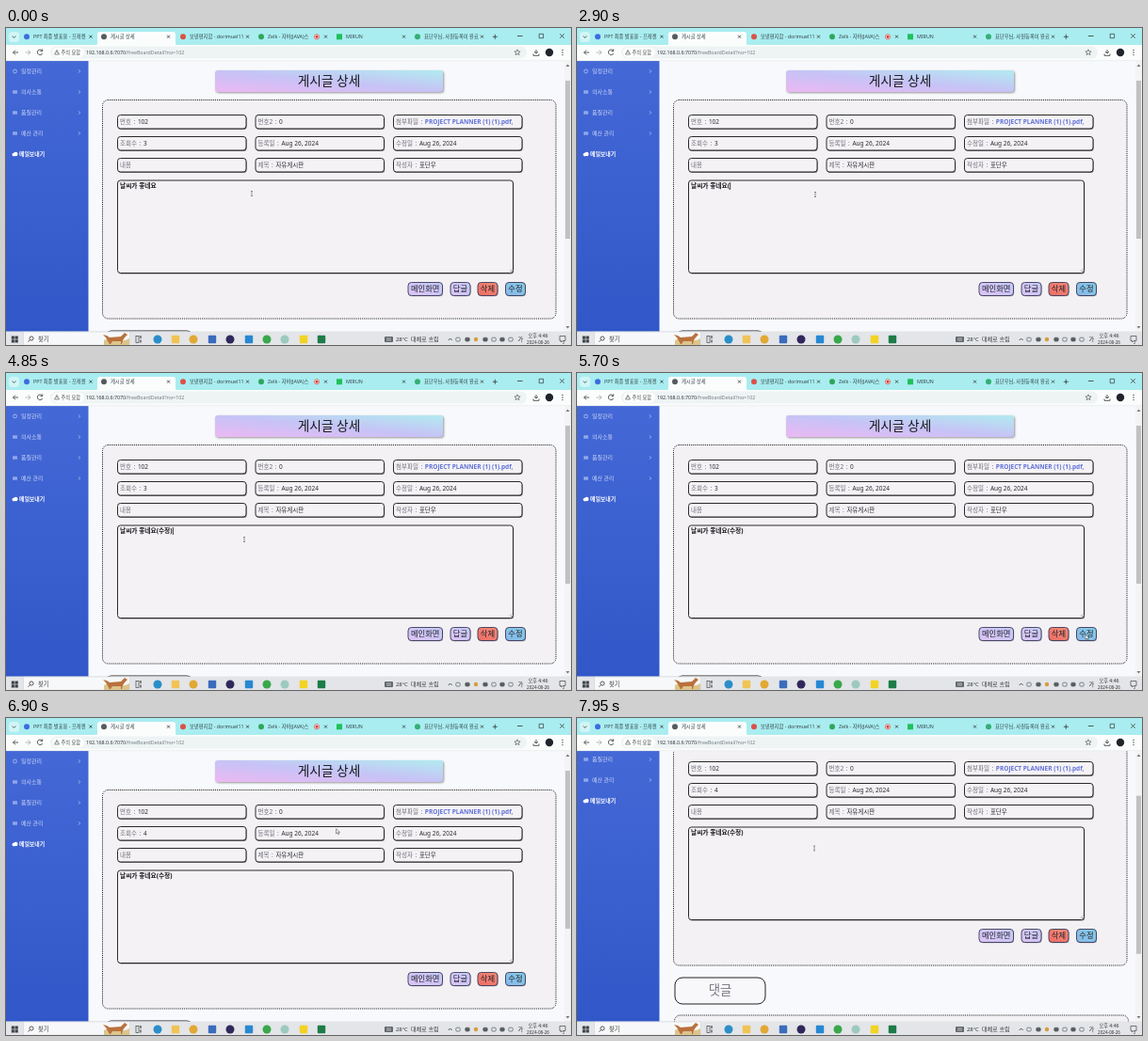
Write an HTML page that moves like this. It is 600 px wide and 337 px high and loops after 8 s.

```html
<!DOCTYPE html>
<html lang="ko">
<head>
<meta charset="utf-8">
<title>게시글 상세</title>
<style>
  html, body { margin: 0; width: 100%; height: 100%; overflow: hidden; background: #f8f9fc; }
  svg { display: block; width: 100vw; height: 100vh; }
  text { font-family: "Noto Sans", "Noto Sans CJK KR", "Noto Sans CJK", sans-serif; }
  .field { word-spacing: 0.9px; }
  .field tspan { word-spacing: 0; }
  .soft { filter: drop-shadow(1px 1.5px 1.2px #0006); }
</style>
</head>
<body>
<svg id="stage" viewBox="0 0 600 337"></svg>
<script>
const LOOP = 8000;
const INK = '#2c2c33', GREY = '#6c6c77';

// Markup helpers
const rect = (x, y, w, h, fill, extra = '') =>
  `<rect x="${x}" y="${y}" width="${w}" height="${h}" fill="${fill}" ${extra}/>`;
const circle = (x, y, r, fill, extra = '') =>
  `<circle cx="${x}" cy="${y}" r="${r}" fill="${fill}" ${extra}/>`;
const text = (x, y, size, fill, content, extra = '') =>
  `<text x="${x}" y="${y}" font-size="${size}" fill="${fill}" ${extra}>${content}</text>`;
const line = (d, color = '#333', width = 0.8, extra = '') =>
  `<path d="${d}" fill="none" stroke="${color}" stroke-width="${width}" ${extra}/>`;
const gradient = (id, colors, direction = 'x1="0" y1="1" x2="1" y2="0"') =>
  `<linearGradient id="${id}" ${direction}>` +
  colors.map((c, i) => `<stop offset="${i / (colors.length - 1)}" stop-color="${c}"/>`).join('') +
  '</linearGradient>';
const cross = (x, y, r) => line(`M${x - r} ${y - r}l${2 * r} ${2 * r}m0 ${-2 * r}l${-2 * r} ${2 * r}`);

const defs = `<defs>
  ${gradient('side', ['#4468d6', '#3157c8'], 'x1="0" y1="0" x2="0" y2="1"')}
  ${gradient('title', ['#ecb8f2', '#c6c3f6', '#b2ebf0'])}
  ${gradient('lilac', ['#dcc3f5', '#c3c9f6'])}
  ${gradient('coral', ['#ee6c64', '#f28a78'])}
  ${gradient('sky', ['#86b9ea', '#86cce6'])}
</defs>`;

function sideMenu() {
  const items = ['일정관리', '의사소통', '품질관리', '예산 관리'].map((name, i) => {
    const y = 46 + 22 * i;
    const icon = i ? rect(7, y - 1.8, 5, 3.6, '#8fa6ea', 'rx=".6"')
                   : circle(9.5, y, 1.9, 'none', 'stroke="#8fa6ea" stroke-width="1.1"');
    return icon + text(16, y + 2.2, 6, '#ccd6f6', name) +
      line(`M77 ${y - 1.7}l1.7 1.7l-1.7 1.7`, '#b3c2f2', 0.8);
  }).join('');
  return items + circle(8.3, 134.6, 1.8, '#fff') + circle(10.3, 134, 2.2, '#fff') +
    text(14, 136.2, 5.9, '#fff', '메일보내기', 'font-weight="700"');
}

const outlined = (x, y, w, h, r = 3) =>
  rect(x + 0.7, y + 1, w, h, '#77777c', `rx="${r}"`) +
  rect(x, y, w, h, '#f4f2f5', `rx="${r}" stroke="#2a2a2a" stroke-width="1"`);

const dotted = (x, y, w, h) =>
  rect(x, y, w, h, '#f3f1f4', 'rx="6" stroke="#222" stroke-width="1" stroke-dasharray="1.1 1"');

function fields() {
  const entries = [
    ['번호', '102'], ['번호2', '0'], ['첨부파일', 'PROJECT PLANNER (1) (1).pdf,'],
    ['조회수', '3'], ['등록일', 'Aug 26, 2024'], ['수정일', 'Aug 26, 2024'],
    ['내용', ''], ['제목', '자유게시판'], ['작성자', '표단우']
  ];
  return entries.map(([label, value], i) => {
    const x = 118.5 + 146.5 * (i % 3), y = 92.5 + 23 * Math.floor(i / 3);
    const style = i === 2 ? 'fill="#6272d8" font-weight="600"' : `fill="${INK}"`;
    const id = label === '조회수' ? 'id="views"' : '';
    const content = value ? `${label} : <tspan ${style} ${id}>${value}</tspan>` : label;
    return outlined(x, y, 136.5, 14.5) + text(x + 2.5, y + 9.6, 6.5, GREY, content, 'class="field"');
  }).join('');
}

const button = (x, w, fill, label) =>
  rect(x + 0.6, 271.2, w, 14, '#9a9aa6', 'rx="3.5"') +
  rect(x, 270.5, w, 14, `url(#${fill})`, 'rx="3.5" stroke="#3a3a58" stroke-width=".9"') +
  text(x + w / 2, 280.4, 8.3, '#24242e', label, 'text-anchor="middle"');

const page = `<g id="page">
  <g class="soft">${rect(222, 45, 242, 23, 'url(#title)', 'rx="3"')}</g>
  ${text(343, 60.8, 13.7, '#17171c', '게시글 상세', 'text-anchor="middle"')}
  ${dotted(102.5, 76.5, 481.5, 232.5)}
  ${fields()}
  ${outlined(118.5, 162, 420, 98.5)}
  ${line('M534.5 259l3-3m-1.2 3l1.2-1.2', '#777', 0.5)}
  <text id="body" x="121" y="170.4" font-size="6.7" font-weight="700" fill="#17171c"></text>
  ${rect(0, 164, 0.8, 8, '#111', 'id="caret"')}
  ${button(427, 36.5, 'lilac', '메인화면')}
  ${button(472, 21, 'lilac', '답글')}
  ${button(501, 21, 'coral', '삭제')}
  ${button(530.5, 21, 'sky', '수정')}
  ${rect(104, 322, 96, 28, '#f8f8fb', 'rx="8" stroke="#222" stroke-width="1"')}
  ${text(152, 340.3, 13.4, '#777783', '댓글', 'text-anchor="middle"')}
  ${dotted(103.5, 362, 482, 120)}
</g>`;

const scrollbar = rect(593, 35, 7, 288, '#f4f4f5') +
  '<path d="M594.5 41l2-2.5l2 2.5zM594.5 317l2 2.5l2-2.5z" fill="#777"/>' +
  rect(594, 56, 5, 168, '#c1c1c4', 'id="thumb"');

function browser() {
  const tabs = [
    [22, '#3f6be0', 'PPT 최종 발표용 - 프레젠'],
    [104, '#555b60', '게시글 상세'],
    [188, '#dc5147', '보낸편지함 - dorimuel11'],
    [271, '#2fa65a', 'Zelk - 자바(JAVA)스'],
    [354, '#20c05a', 'MIRUN'],
    [437, '#35ae74', '표단우님, 사원등록이 완료']
  ];
  const tabMarks = tabs.map(([x, color, label], i) =>
    (i === 4 ? rect(x - 3, 6.3, 6, 6, color) : circle(x, 9.3, 3, color)) +
    text(x + 7, 11.4, 5.3, '#35464b', label) +
    cross(i ? x + 68.5 : 90, 9.2, 1.5)).join('');
  return rect(0, 0, 600, 19, '#a9edf0') +
    '<path d="M94 19q3 0 3-3V7q0-3 3-3h77q3 0 3 3v9q0 3 3 3z" fill="#fbfdfd"/>' +
    rect(0, 18, 600, 17, '#fbfdfd') + rect(0, 34.6, 600, 0.5, '#d9e2e3') +
    rect(3, 4, 11, 11, '#d2f5f6', 'rx="3.5"') + line('M6.7 8.6l1.8 1.8l1.8-1.8') +
    tabMarks + circle(330, 9.3, 2.6, '#fff', 'stroke="#d63b36" stroke-width=".7"') + circle(330, 9.3, 1.5, '#d63b36') +
    line('M516.8 9.3h5m-2.5-2.5v5M543 8.5h5.5') + line('M566.2 6.3h4.4v4.4h-4.4z', '#333', 0.7) + cross(590.5, 8.5, 2.2) +
    line('M13 26H7.5m2.5-2.5l-2.5 2.5l2.5 2.5') +
    line('M20.5 26H26m-2.5-2.5l2.5 2.5l-2.5 2.5', '#a0a8aa') +
    line('M38.3 24a2.8 2.8 0 1 0 .4 3M38.7 22.4v2.2h-2.2') +
    rect(47, 19.6, 506, 13, '#eef3f4', 'rx="6.5"') + rect(49, 20.8, 34, 10.6, '#fbfdfd', 'rx="5.3"') +
    line('M54 23.4l2.5 4.6h-5zM54 25v1.4', '#444', 0.6) + text(58.5, 27.9, 5.2, '#444', '주의 요함') +
    text(85, 28, 5.3, '#30383a', '192.168.0.6:7070<tspan fill="#737d80">/freeBoardDetail?no=102</tspan>') +
    line('M543 22.8l.9 2.1l2.2.1l-1.7 1.4l.6 2.2l-2-1.2l-2 1.2l.6-2.2l-1.7-1.4l2.2-.1z', '#444', 0.6) +
    line('M563 23v4m-2-2l2 2l2-2M560 27.5v1.8h6v-1.8') +
    circle(577, 26, 4.2, '#20252c') +
    [23.4, 26, 28.6].map(y => circle(591, y, 0.7, '#333')).join('');
}

function taskbar() {
  const apps = [[161, '#2b8ec8'], [180, '#f1c355', true], [199, '#e2a834'], [219, '#3a6cbd', true], [238, '#30285c'],
    [258, '#2788d2', true], [277, '#39a84b'], [296, '#9ccabd'], [316, '#f3d321', true], [335, '#1d7c47', true]];
  const icons = apps.map(([x, color, square]) =>
    square ? rect(x - 4.2, 326.8, 8.4, 8.4, color, 'rx="1"') : circle(x, 331, 4.5, color)).join('');
  const tray = [480, 490, 499, 509, 518, 527, 536].map((x, i) =>
    i === 2 ? circle(x, 331, 2.2, '#d99b3d')
            : rect(x - 2.2, 329.2, 4.4, 3.8, i % 2 ? '#555d62' : 'none', 'rx="1" stroke="#555d62" stroke-width=".7"')).join('');
  return rect(0, 322.5, 600, 14.5, '#e3e5e8') +
    rect(5.8, 327.5, 7, 7, '#3a4247') + line('M9.3 327v8M5.5 331h8', '#e3e5e8', 0.6) +
    rect(18.5, 323, 113, 14, '#f7f8f9', 'stroke="#cbcfd2" stroke-width=".5"') +
    circle(27, 330, 2.1, 'none', 'stroke="#333" stroke-width=".8"') + line('M25.5 331.6l-2 2.1') +
    text(34, 332.8, 6.3, '#444', '찾기') +
    '<path d="M104 337v-5q7-4 14-1t13-1v7z" fill="#dcc58c"/><path d="M106 329l-3-3l4 1l3 2l12-1l4-4l3 2l-3 3l-2 3l-1 4h-1v-3h-9l-2 3h-1z" fill="#ba713d"/>' +
    rect(138, 327.5, 3, 7, 'none', 'stroke="#444" stroke-width=".7"') + line('M143 327v3m0 1.5v3', '#444', 1.2) +
    icons +
    rect(402, 328, 9, 6, '#62676c', 'rx="1"') + line('M404 330h5m-5 2h5', '#e3e5e8', 0.7) +
    text(414, 333, 5.8, '#333', '28°C') + text(430, 333, 6.1, '#333', '대체로 흐림') +
    line('M469.7 332l2-2l2 2') + tray + text(543.5, 333, 6.2, '#333', '가') +
    text(565, 329.2, 5.2, '#333', '오후 4:46', 'text-anchor="middle"') +
    text(565, 335.8, 4.6, '#333', '2024-08-26', 'text-anchor="middle"') +
    line('M588 327.5h6v5h-3l-1.5 1.5v-1.5H588z', '#444', 0.7) + text(591, 335.8, 4, '#333', '2');
}

const dialog = `<g id="dialog">
  <g style="filter:drop-shadow(0 1px 2px #0006)">${rect(212.5, 35, 175, 56, '#fff', 'rx="4"')}</g>
  ${text(220.5, 49, 6.4, '#222', '192.168.0.6:7070 내용:')}
  ${text(220.5, 60.2, 5.3, '#555', '수정하시겠습니까?')}
  ${rect(325.5, 67, 27, 17, '#fff', 'rx="8.5" stroke="#2b6f7c" stroke-width="1.2"')}
  ${rect(327.3, 68.8, 23.4, 13.4, '#326875', 'rx="6.7"')}
  ${text(339, 77.4, 5.2, '#d8f0f3', '확인', 'text-anchor="middle"')}
  ${rect(355, 68.5, 24, 14, '#fff', 'rx="7" stroke="#9fdde2" stroke-width=".9"')}
  ${text(367, 77.4, 5.2, '#2b707b', '취소', 'text-anchor="middle"')}
</g>`;

const pointers = `<g id="pointer">
  <path id="arrow" d="M0 0v5.3l1.3-1.2l.8 1.9l1-.4l-.9-1.8h1.7z" fill="#fff" stroke="#333" stroke-width=".5"/>
  ${line('M-1 -2.5h2M0 -2.5v5M-1 2.5h2', '#555', 0.6, 'id="beam"')}
</g>`;

document.getElementById('stage').innerHTML = defs + rect(0, 0, 600, 337, '#f8f9fc') +
  rect(0, 35, 87.5, 288, 'url(#side)') + `<g id="menu">${sideMenu()}</g>` +
  page + scrollbar + browser() + dialog + taskbar() + pointers;

const el = Object.fromEntries([...document.querySelectorAll('[id]')].map(e => [e.id, e]));

// Time, then the characters after the fixed sentence
const typing = [[0, ''], [800, ''], [1250, '9'], [1950, ''], [2750, '('], [3250, '(ㅅ'], [3400, '(수'],
  [3650, '(숮'], [3800, '(수저'], [4000, '(수정'], [4500, '(수정)']];
const pointerPath = [[0, 261, 176], [350, 261, 176], [850, 253, 177], [4950, 253, 177], [5450, 540, 278],
  [5800, 540, 278], [6250, 342, 75.5], [6650, 342, 75.5], [7050, 354.5, 137], [7450, 354.5, 137], [7800, 252, 138.5], [LOOP, 252, 138.5]];
const scrollPath = [[0, 0], [7280, 0], [7400, 8], [7850, 46], [LOOP, 46]];

function along(path, t) {
  const i = Math.max(1, path.findIndex(p => p[0] > t));
  const a = path[i - 1], b = path[i];
  const u = (t - a[0]) / (b[0] - a[0]), k = u * u * (3 - 2 * u);
  return a.slice(1).map((v, j) => v + (b[j + 1] - v) * k);
}
const show = (node, visible) => node.setAttribute('visibility', visible ? 'visible' : 'hidden');

function draw(t) {
  const [keyTime, suffix] = typing.filter(k => k[0] <= t).pop();
  el.body.textContent = '날씨가 좋네요' + suffix;
  el.caret.setAttribute('x', 121.4 + el.body.getComputedTextLength());
  show(el.caret, t >= 800 && t < 5450 && (t - keyTime) % 1000 < 500);
  el.views.textContent = t < 6900 ? '3' : '4';
  show(el.dialog, t >= 5750 && t < 6600);

  const [scroll] = along(scrollPath, t);
  el.page.setAttribute('transform', `translate(0 ${-scroll})`);
  el.menu.setAttribute('transform', `translate(0 ${-scroll})`);
  el.thumb.setAttribute('y', 56 + scroll * 0.58);

  el.pointer.setAttribute('transform', `translate(${along(pointerPath, t).join(' ')})`);
  const isArrow = t > 5200 && t < 7600;
  show(el.arrow, isArrow);
  show(el.beam, !isArrow);
}

function tick() {
  draw(performance.now() % LOOP);
  requestAnimationFrame(tick);
}
tick();
</script>
</body>
</html>
```
